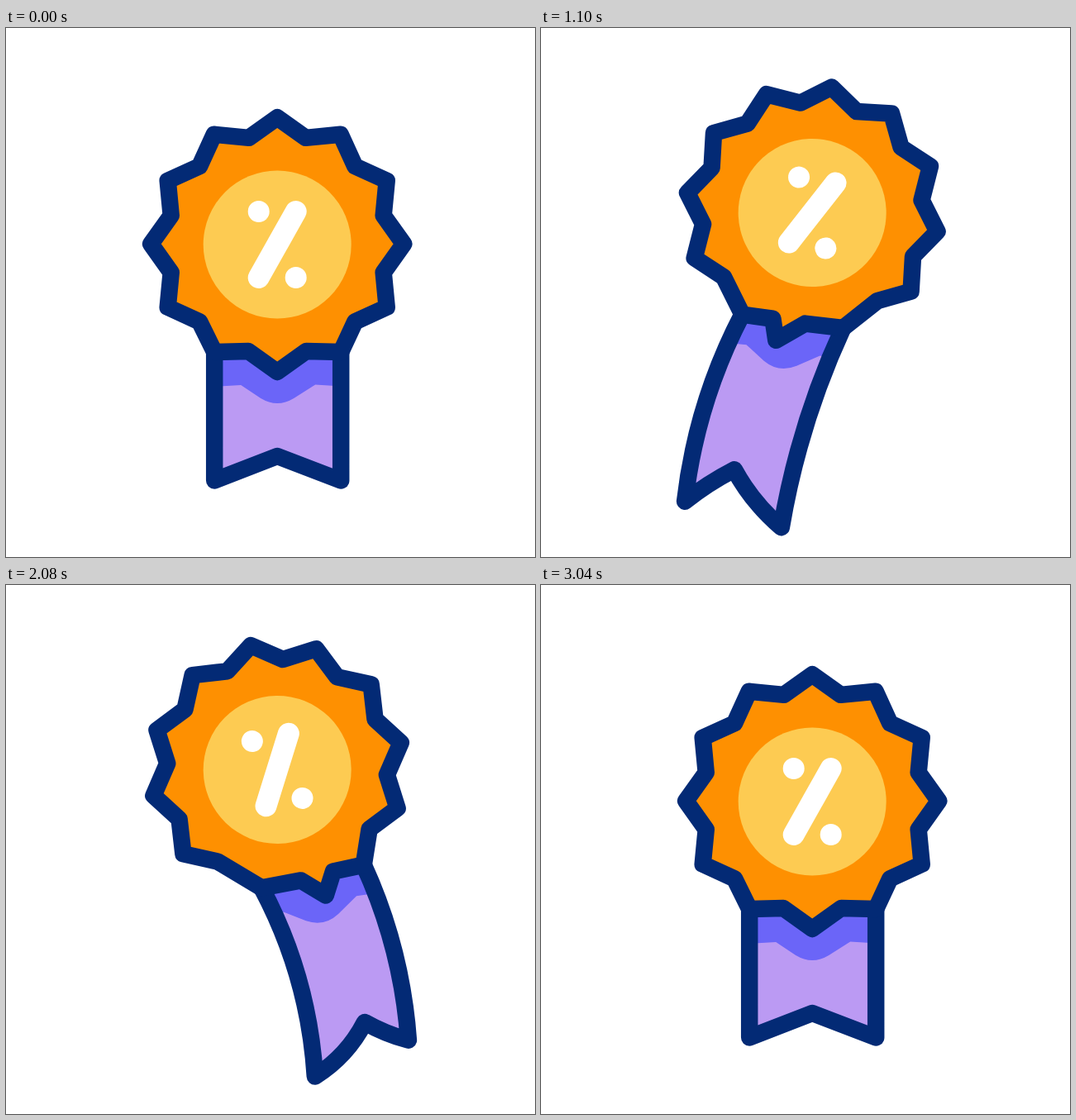
An HTML page that plays this animation: 640 by 640 pixels, repeating every 3.22 s.

```html
<!DOCTYPE html>
<html lang="en">
<head>
<meta charset="utf-8">
<title>Swinging discount rosette</title>
<style>
  html, body { margin: 0; width: 100%; height: 100%; overflow: hidden; background: #fff; }
  svg { display: block; width: 100vw; height: 100vh; }
  .line { fill: none; stroke: #032a75; stroke-width: 20.5; stroke-linecap: round; stroke-linejoin: round; }
</style>
</head>
<body>
<svg viewBox="0 0 640 640">
  <defs><clipPath id="ribbonClip"><path id="clipShape"/></clipPath></defs>
  <g id="rosette">
    <path id="ribbonFill" fill="#bb9af3"/>
    <g clip-path="url(#ribbonClip)">
      <path id="shade" fill="#6b65f8" d="M-130 175L-44 170L-20 186Q0 198 20 186L46 169.500L130 175V90H-130Z"/>
    </g>
    <path id="ribbonLine" class="line"/>
    <path id="star" class="line" style="fill:#fe9001"/>
    <circle r="89.500" fill="#fdcb52"/>
    <path d="M22.500 -40L-22.500 40" stroke="#fff" stroke-width="26" stroke-linecap="round"/>
    <circle cx="-22.500" cy="-40" r="13" fill="#fff"/>
    <circle cx="22.500" cy="40" r="13" fill="#fff"/>
  </g>
</svg>
<script>
const LOOP = 3220, SWING = 334, END = 3040;
const byId = id => document.getElementById(id);

// knot: star points shared with the ribbon top, left to right
// tail: left tip, notch, right tip
// bend: bulge of left side, left hem, right hem, right side
const rest = {
  angle: 0, lift: 0, shade: 0,
  knot: [[-76, 130], [-35, 129], [0, 154], [35, 129], [77, 130]],
  tail: [[-76, 285.5], [0, 256], [77, 285.5]],
  bend: [0, 0, 0, 0]
};
const softLeft = {
  angle: 7.5, lift: 38.5, shade: -24.5,
  knot: [[-77, 131], [-52, 130], [-29.5, 153.5], [-5, 130.5], [60, 130.5]],
  tail: [[-70.5, 354.7], [-28, 316.5], [67.4, 340.5]],
  bend: [8, 0, 7.5, -10.5]
};
const softRight = {
  angle: -7.5, lift: 38.5, shade: 7,
  knot: [[-71, 130.5], [-17, 128], [5, 153], [31.5, 131], [58, 132.5]],
  tail: [[-61.7, 351.7], [15.5, 313.3], [66.7, 348.7]],
  bend: [-12, 8, 0, 10.5]
};
const left = {
  angle: 15, lift: 38.5, shade: -19,
  knot: [[-70.5, 134], [-37, 133], [-34, 158.5], [2.6, 133.5], [52, 131.5]],
  tail: [[-118, 367], [-71, 321.5], [3, 389]],
  bend: [18, -4, 5, -14]
};
const right = {
  angle: -15, lift: 38.5, shade: 22,
  knot: [[-44, 136.5], [8, 138], [34, 162], [47.5, 135], [81, 135]],
  tail: [[-27, 375], [50, 321.5], [90, 355]],
  bend: [-16, 7, 1, 13]
};
const keys = [rest, softLeft, softRight, left, right, left, right, softLeft, softRight]
  .map((pose, i) => [i * SWING, pose]);
keys.push([END, rest]);

const ease = t => t * t * (3 - 2 * t);

function mix(a, b, p) {
  if (typeof a === 'number') return a + (b - a) * p;
  if (Array.isArray(a)) return a.map((v, i) => mix(v, b[i], p));
  return Object.fromEntries(Object.keys(a).map(k => [k, mix(a[k], b[k], p)]));
}

function poseAt(time) {
  const i = keys.findIndex(([at]) => at > time);
  if (i < 0) return rest;
  const [t0, from] = keys[i - 1], [t1, to] = keys[i];
  return mix(from, to, ease((time - t0) / (t1 - t0)));
}

const pt = ([x, y]) => x.toFixed(2) + ' ' + y.toFixed(2);

// quadratic segment whose middle lies `bulge` off the chord
function curve(p, q, bulge) {
  const dx = q[0] - p[0], dy = q[1] - p[1], k = 2 * bulge / Math.hypot(dx, dy);
  const control = [(p[0] + q[0]) / 2 - dy * k, (p[1] + q[1]) / 2 + dx * k];
  return 'Q' + pt(control) + ' ' + pt(q);
}

const crown = Array.from({ length: 19 }, (_, i) => {
  const k = i - 9, r = k % 2 ? 133 : 153, a = k * Math.PI / 12;
  return [r * Math.sin(a), -r * Math.cos(a) - 0.7];
});

function draw(time) {
  const { angle, lift, shade, knot, tail, bend } = poseAt(time);
  const corners = [knot[0], ...tail, knot[4]];
  const ribbon = 'M' + pt(corners[0]) +
    bend.map((b, i) => curve(corners[i], corners[i + 1], b)).join('');
  byId('ribbonLine').setAttribute('d', ribbon);
  byId('ribbonFill').setAttribute('d', ribbon + 'Z');
  byId('clipShape').setAttribute('d', ribbon + 'Z');
  byId('shade').setAttribute('transform', `translate(${shade} 0)`);
  byId('star').setAttribute('d', 'M' + [...crown, ...[...knot].reverse()].map(pt).join('L') + 'Z');
  byId('rosette').setAttribute('transform', `translate(328.2 ${262 - lift}) rotate(${angle})`);
}

let start;
function tick(now) {
  start ??= now;
  draw((now - start) % LOOP);
  requestAnimationFrame(tick);
}
draw(0);
requestAnimationFrame(tick);
</script>
</body>
</html>
```
